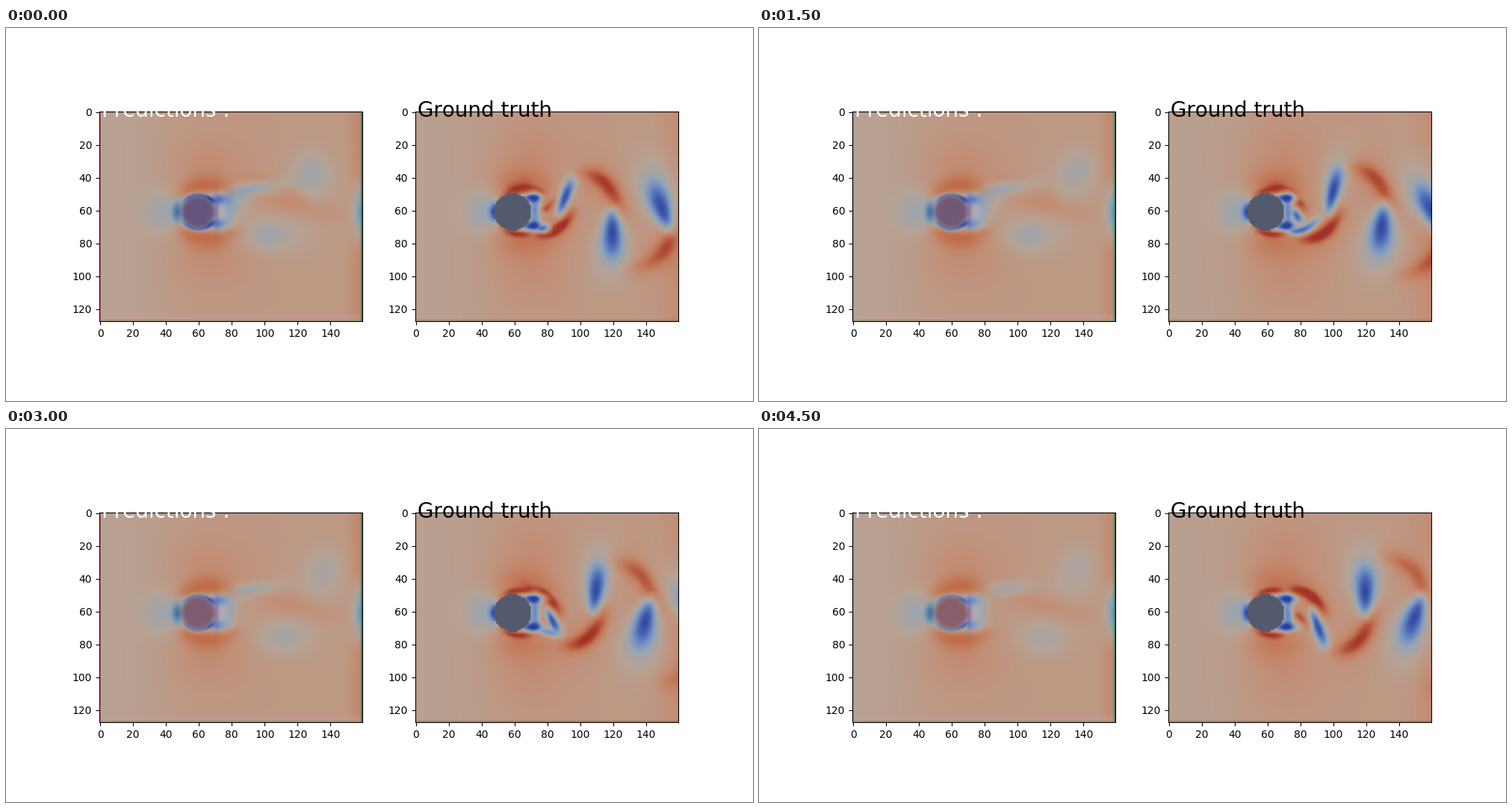
Animation, 1000 px wide and 500 px high, one loop 5000 ms. Source, as a matplotlib script:

```python
import numpy as np
import matplotlib.pyplot as plt
from matplotlib.animation import FuncAnimation
from matplotlib.colors import LinearSegmentedColormap

W, H, STEPS = 160, 128, 10
HALF = 9          # steps between two sheddings on opposite sides
MID = 61          # wake centre line
X, Y = np.meshgrid(np.arange(W, dtype=float), np.arange(H, dtype=float))
OFF = np.abs(Y - MID)

# slow (blue) through free stream (beige) to fast (red)
SPEED = LinearSegmentedColormap.from_list("speed", [
    "#2c3e9b", "#4a66b2", "#6f8fc4", "#98a6b4", "#b8a395",
    "#c28f76", "#c27757", "#b04a36", "#941c1c"])

plt.rcParams["text.kerning_factor"] = 6


def blob(cx, cy, sx, sy):
    return np.exp(-((X - cx) / sx) ** 2 / 2 - ((Y - cy) / sy) ** 2 / 2)


def ramp(u, start, end):
    s = np.clip((u - start) / (end - start), 0, 1)
    return s * s * (3 - 2 * s)


def stroke(start, ctrl, end, width, grow=0.0, flip=False):
    """Soft brush along a quadratic curve, strongest in its middle."""
    yy = 2 * MID - Y if flip else Y
    out = np.zeros_like(X)
    for t in np.linspace(0, 1, 26):
        px, py = ((1 - t) ** 2 * a + 2 * t * (1 - t) * b + t * t * c
                  for a, b, c in zip(start, ctrl, end))
        w = width * (1 + grow * (t - 0.5))
        k = np.sin(np.pi * (0.12 + 0.76 * t))
        np.maximum(out, k * np.exp(-((X - px) ** 2 + (yy - py) ** 2) / (2 * w * w)), out=out)
    return out


def colour(fast, slow):
    slow = np.clip(slow, 0, 1)
    v = np.clip(fast, 0, 0.88) * (1 - slow) - slow
    return SPEED(0.5 + 0.5 * v)[..., :3] * 255


def tint(img, rgb, alpha):
    a = np.asarray(alpha)[..., None]
    return img * (1 - a) + np.array(rgb) * a


def drift(age):
    """Distance downstream: slow while forming, then steady."""
    return 72 + 3.35 * 3 * np.log1p(np.exp((age + 5) / 3))


def slow_lobe(age, flip):
    """Teardrop of slow fluid that tilts backwards as it ages."""
    cx = drift(age)
    cy = MID + 14 * np.exp(-((age - 6) / 9) ** 2)
    size = ramp(age, -12, 4)
    dx, dy = 4.5 * (1 - age / HALF) * size, 12 * size
    width = 2 + 2 * ramp(age, -4, 14)
    start, end = (cx - dx, cy - dy), (cx + dx, cy + dy)
    core = 0.9 * ramp(age, -14, -4) * stroke(start, (cx, cy), end, width, 0.4, flip)
    far = (cx + 1.8 * dx, cy + 1.9 * dy)
    halo = 0.36 * ramp(age, -3, 5) * stroke(start, (cx, cy + 4), far, 2 * width, 0.9, flip)
    return core + halo * (1 - core)


def fast_arc(age, flip):
    """Arc of fast fluid that wraps over the lobe."""
    cx, old = drift(age), max(age, 0)
    start = (max(56, cx - 18), 48 - 1.2 * old)
    ctrl = (cx - 4 + 0.045 * age ** 2, 46 - 0.7 * old)
    end = (cx + 4.5, MID - 10 * (1 - ramp(age, -12, -4)))
    amp, width = 0.72 - 0.014 * old, 2.1 + 1.8 * ramp(age, -4, 12)
    return amp * (stroke(start, ctrl, end, width, flip=flip)
                  + 0.22 * stroke(start, ctrl, end, 3 * width, flip=flip))


def shear_tail(age, flip):
    """Slow streak leaving the cylinder; it curls up before it breaks off."""
    u = np.clip((age + HALF) / HALF, 0, 1)
    curl = np.sin(np.pi * min(1, 1.5 * u))
    end = (80 + 13 * u + 7 * curl, 70 + 6 * u - 8 * curl)
    return 0.85 * (1 - u ** 3) * stroke((69, 70), (78 + 5 * u, 72 + 2 * u + 5 * curl),
                                        end, 1.9, flip=flip)


def tongue(age, flip):
    dx = 1.5 * age
    return 0.5 * np.exp(-(age / 2.5) ** 2) * stroke(
        (74 + dx, 60), (79 + dx, 62), (84 + dx, 69), 1.9, flip=flip)


def truth(n):
    fast = 0.04 + 0.1 * ramp(X, 15, 75) + 0.12 * ramp(X, 142, 160)
    slow = 0.8 * blob(47.5, MID, 2.2, 4) + 0.28 * blob(40, MID, 7, 9)
    slow += 0.65 * blob(72, MID, 2.5, 7)
    edge = np.zeros_like(X)
    for side in (-1, 1):
        fast += 0.25 * blob(63, MID + side * 17, 11, 7)
        fast += 0.14 * blob(68, MID + side * 30, 17, 17)
        slow += 0.85 * blob(70, MID + side * 8.7, 5.5, 2)
        edge += 0.5 * stroke((51, 52), (58, 45), (75, 49), 1.5, flip=side > 0)
    for k in range(4):
        age, flip = n + HALF * (k - 1), k % 2 == 1
        edge = np.maximum(edge, fast_arc(age, flip) + tongue(age, flip))
        slow = np.maximum(slow, slow_lobe(age, flip))
        slow = np.maximum(slow, shear_tail(age, flip))
    img = colour(fast + edge, slow)
    img[np.hypot(X - 58.5, Y - MID) < 11.4] = (84, 90, 110)
    img[-1] *= 0.88
    return img


def prediction(n):
    s = n / (STEPS - 1)
    keep = 1 - s
    r = np.hypot(X - 59.5, Y - MID)
    crescent = np.exp(-((np.hypot(X - 65, Y - MID) - 16) / 6) ** 2) * ramp(OFF, 6, 15)
    fast = 0.02 + 0.12 * ramp(X, 10, 65) + 0.3 * crescent
    fast += 0.14 * (blob(66, 36, 17, 13) + blob(66, 86, 17, 13))
    fast += 0.16 * ramp(X, 148, 157) * ramp(OFF, 12, 26)
    fast += 0.22 * stroke((102, 54), (118, 57), (140, 62), 5)
    fast += 0.2 * keep * stroke((78, 45), (105, 36), (122, 54), 3)

    slow = 0.5 * blob(47, MID, 2.5, 4.5) + 0.26 * blob(38, MID, 8, 9)
    slow += (0.75 - 0.15 * s) * np.exp(-((r - 10.5) / 1.5) ** 2) * ramp(OFF, 3, 9)
    slow += (0.6 - 0.1 * s) * (blob(71, 53.5, 4, 2.8) + blob(71, 68.5, 4, 2.8))
    slow += 0.3 * blob(77, MID, 4, 8) + 0.22 * keep * blob(83, 55, 6, 6)
    slow += (0.36 - 0.1 * s) * stroke((75, 50), (90, 46), (114 - 6 * s, 44), 3.2)
    slow += (0.22 - 0.06 * s) * blob(128 + 8 * min(1, 3 * s), 35 - 4 * s, 8, 9)
    slow += (0.25 - 0.12 * s) * blob(100 + 12 * s, 75 + 2 * s, 10, 7)
    slow += 0.1 * (blob(120, 72, 14, 12) + blob(130, 46, 12, 10))
    slow += 0.5 * blob(159.5, MID, 4, 8)
    img = colour(fast, slow)

    img = tint(img, (192, 108, 62), 0.4 * crescent)
    img = tint(img, (40, 98, 108), 0.45 * blob(47, MID, 1.8, 4))
    disc = np.array((93, 80, 124)) * keep + np.array((133, 90, 106)) * s
    img = tint(img, disc, 0.92 / (1 + np.exp((r - 9.9) / 0.6)))
    img = tint(img, (104, 72, 180), 0.5 * blob(70.5, MID, 0.9, 7))
    img = tint(img, (190, 182, 196), 0.4 * blob(75, MID, 2, 7))
    img = tint(img, (70, 160, 185), 0.4 * blob(159, MID, 2.5, 8))

    # border artefacts of the network output
    img[124:127] = tint(img[124:127], (202, 156, 152), 0.4)
    img[-1] = (160, 150, 125)
    img[0] = (172, 146, 112)
    img[:, 1:4] = tint(img[:, 1:4], (168, 170, 150), 0.4)
    img[:, 0] = (230, 110, 132)
    img[:, 158] = tint(img[:, 158], (110, 140, 105), 0.4)
    img[:, 159] = (40, 116, 98)
    return img


def to_bytes(img):
    return np.clip(img, 0, 255).astype(np.uint8)


frames = [(to_bytes(prediction(n)), to_bytes(truth(n))) for n in range(STEPS)]

fig, axes = plt.subplots(1, 2, figsize=(10, 5), dpi=100)
views = [ax.imshow(img) for ax, img in zip(axes, frames[0])]
axes[0].text(1, 3, "Predictions :", color="white", fontsize=20)
axes[1].text(1, 3, "Ground truth", color="black", fontsize=20)


def update(n):
    for view, img in zip(views, frames[n]):
        view.set_data(img)
    return views


anim = FuncAnimation(fig, update, frames=STEPS, interval=500, repeat=True, repeat_delay=0)
plt.show()
```
